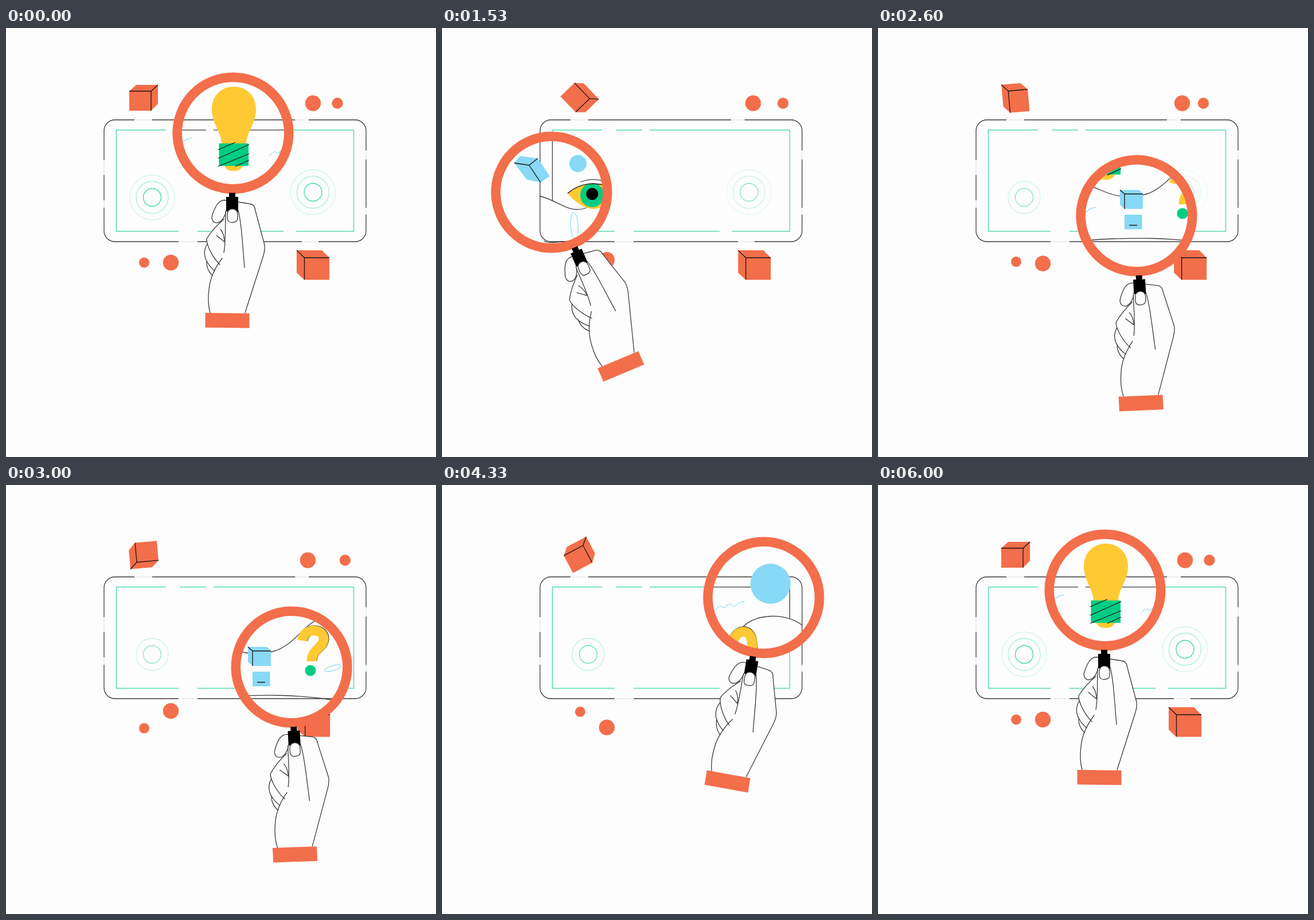
Write an HTML page that moves like this. It is 750 by 747 pixels and loops after 6030 ms.

```html
<!DOCTYPE html>
<html lang="en">
<head>
<meta charset="utf-8">
<title>Magnifier</title>
<style>
  html, body { margin: 0; width: 100%; height: 100%; overflow: hidden; background: #fdfdfd; }
  svg { display: block; width: 100%; height: 100%; }
  .paper { fill: #fdfdfd; }
  .orange { fill: #f36e4a; }
  .blue { fill: #87d9f5; }
  .yellow { fill: #ffc933; }
  .green { fill: #00cc82; }
  .line { fill: none; stroke: #3c3c3c; stroke-width: 1.3; stroke-linecap: round; stroke-linejoin: round; }
  .edge { fill: none; stroke: #1c1512; stroke-width: 1.3; }
  .thin { fill: none; stroke: #87d9f5; stroke-width: 1.1; }
  .mint { fill: none; stroke: #3cd9a5; stroke-width: 1.3; }
  .gap { fill: none; stroke: #fdfdfd; stroke-width: 4; }
  .faint { fill: none; stroke: #dedede; stroke-width: 1; }
</style>
</head>
<body>
<svg viewBox="0 0 750 747" preserveAspectRatio="none">
  <defs>
    <clipPath id="view"><circle id="viewHole" r="92"/></clipPath>
    <rect id="phone" x="171" y="160" width="457" height="212" rx="19"/>
    <rect id="screen" x="192.5" y="177.7" width="414" height="176.3"/>
    <path id="screenGaps" d="M279 177.7H303M349 177.7H362M301 354H334M484 354H506"/>
    <path id="phoneGaps" d="M224 160H255M504 160H528M301 372H334M516 372H545M171 230V256M171 300V313M628 213V229M628 313V325"/>
    <path id="wave" d="M0 0C4 -5 8 -9 11 -7S15 -3 20 -8S27 -11 30 -9S34 -6 39 -11S46 -13 52 -16"/>
    <path id="hook" d="M517 271C519 258 527 253.500 537 253.500C549 253.500 555 261 554 270C552 284 533 287 533 307"/>
    <g id="rings">
      <circle class="mint" r="15.5"/>
      <circle class="mint" r="28" stroke-opacity=".42"/>
    </g>
  </defs>

  <use href="#phone" class="line"/>
  <use href="#phoneGaps" class="gap"/>
  <use href="#phoneGaps" class="faint"/>
  <use href="#screen" class="mint"/>
  <use href="#screenGaps" class="gap"/>

  <g transform="translate(255 295)">
    <use id="ringsL" href="#rings"/>
    <circle id="outerL" class="mint" r="39"/>
  </g>
  <g id="ringsR" transform="translate(535.5 286)">
    <use href="#rings"/>
    <circle class="mint" r="39" stroke-opacity=".22"/>
  </g>

  <g id="cubeTop">
    <path class="orange" d="M215 110L227 99H265V132L253 144H215Z"/>
    <path class="edge" d="M215 110H253L265 99M253 110V144"/>
  </g>
  <g id="cubeLow">
    <path class="orange" d="M0 387H44L57 400V438.500H13L0 426Z"/>
    <path class="edge" d="M0 387L13.500 400H57M13.500 400V438"/>
  </g>
  <g class="orange">
    <circle id="dotA" cy="131" r="13.7"/>
    <circle id="dotB" cy="131" r="9.7"/>
    <circle id="dotC" cx="241" r="9"/>
    <circle id="dotD" cx="287.5" r="13.7"/>
  </g>

  <!-- what the glass reveals -->
  <g clip-path="url(#view)">
    <rect class="paper" width="750" height="747"/>
    <use href="#screen" class="line"/>
    <use href="#screenGaps" class="gap"/>
    <path class="paper" d="M171 293C195 298 215 316 235 316Q245 316 252 313L298 276C330 258 360 270 390 283S440 296 465 290S508 262 526 246C548 224 598 222 628 244V372H171Z"/>
    <path class="line" d="M171 293C195 298 215 316 235 316Q245 316 252 313M298 276C330 258 360 270 390 283S440 296 465 290S508 262 526 246C548 224 598 222 628 244"/>
    <use href="#phone" class="line"/>
    <path class="line" d="M178 371Q184 375 200 373T250 370M297 376C340 373 370 368 410 367S500 364 568 374"/>

    <circle class="blue" cx="237" cy="236" r="15"/>
    <path class="blue" d="M126 235L136 223L167 227L188 258L172 269L148 264Z"/>
    <path class="edge" d="M126 235L152 239L167 227M152 239L172 269"/>
    <ellipse class="thin" cx="231" cy="345" rx="6.5" ry="24" transform="rotate(-3 231 345)"/>

    <g id="eye">
      <path class="yellow" d="M-43 -1C-28 -14 -12 -18 2 -18C18 -17 32 -15 43 -8C30 10 18 26 4 26C-14 26 -30 14 -43 -1Z"/>
      <circle class="green" cy="2" r="21"/>
      <circle r="10.500"/>
      <path class="paper" d="M-30 -30H30V-13Q2 -23 -30 -11Z"/>
      <path class="edge" d="M-43 -1C-28 -14 -12 -18 2 -18C18 -17 32 -15 43 -8"/>
      <path class="line" d="M-20 -21C-8 -26 6 -26 19 -23"/>
    </g>

    <g id="bulb">
      <path class="yellow" d="M376 203C376 180 359 168 359 141C359 118 376 102 397 102C419 102 436 118 436 141C436 168 419 180 419 203ZM380 239Q384 249 397 249T414 239Z"/>
      <rect class="green" x="371.500" y="201" width="51.500" height="39"/>
      <path class="edge" d="M370 212L400 199M370 227L424 203M370 241L424 219M400 241L424 230"/>
    </g>

    <path class="blue" d="M422 282H455L462 288V315H430L422 308Z"/>
    <path class="edge" d="M422 282L430 289H462M430 289V315"/>
    <rect class="blue" x="430" y="325" width="30.500" height="25.500"/>
    <path class="edge" d="M438 343.500H452"/>

    <use href="#wave" class="thin" x="273" y="207"/>
    <use href="#wave" class="thin" x="328" y="328"/>
    <use id="waveR" href="#wave" class="thin"/>
    <ellipse class="thin" cx="570" cy="319" rx="15" ry="4.500" transform="rotate(-17 570 319)"/>
    <circle id="ball" class="blue" cx="573" r="35"/>

    <g id="ask">
      <use href="#hook" fill="none" stroke="#2a2a2a" stroke-width="17" transform="translate(.9 -.4)"/>
      <use href="#hook" fill="none" stroke="#ffc933" stroke-width="17"/>
      <circle class="green" cx="531" cy="323" r="9.5"/>
    </g>
  </g>

  <!-- glass and hand, modelled upright around 396 183 -->
  <g id="glass">
    <circle cx="396" cy="183" r="97.300" fill="none" stroke="#f36e4a" stroke-width="16.500"/>
    <path class="paper" d="M384 300L405 303L424 306C432 307 434 311 435 318L451 378Q452 386 449 396L417 497H356C353 485 352 470 354 455C355 445 357 438 361 431C352 424 349 412 349 404C345 396 346 385 351 376L350 366C355 357 362 347 370 339C362 341 357 335 360 325C366 308 372 298 384 300Z"/>
    <g class="line">
      <path d="M384 300C372 298 366 308 360 325C357 335 363 340 369 339C378 337 383 325 384 318"/>
      <path d="M405 303L424 306C432 307 434 311 435 318L451 378Q452 386 449 396L417 496"/>
      <path d="M383 320C382 340 384 368 380 391M405 318C410 335 412 368 416 417"/>
      <path d="M380 333C366 345 356 357 350 367C350 380 361 400 373 412"/>
      <path d="M374.500 351C379 357 381 365 381 372.500M367 361L381 372.500"/>
      <path d="M351 376C346 384 345 393 348 402C353 413 358 418 364 423M350 405C349 416 353 424 360 431"/>
      <path d="M377 401C364 418 356 435 354 455C352 470 353 485 356 496"/>
    </g>
    <path d="M389 287H400V294H405V320H384V294H389Z"/>
    <path class="paper" d="M384 319L386 340H404L405 321Z"/>
    <path class="paper" stroke="#3c3c3c" stroke-width="1.3" d="M386 324C386 312 404 312 404 324V331Q404 338 395 338.500T386 331Z"/>
    <path class="orange" d="M347.500 496L424.500 497V522.500L347.500 521.500Z"/>
  </g>
</svg>

<script>
const LOOP = 6030, END = 6000;
const $ = id => document.getElementById(id);
const clamp = v => Math.min(1, Math.max(0, v));
const ease = (t, from, to) => {
  const u = clamp((t - from) / (to - from));
  return u * u * (3 - 2 * u);
};
const wave = (t, period, peak = 0) => Math.cos(2 * Math.PI * (t - peak) / period);

// Sway around a rest position, which is held where the loop joins
const sway = (t, rest, size, period, peak) =>
  rest + clamp(Math.min(t, END - t) / 400) * size * wave(t, period, peak);

// Stops of the glass: time, x, y, angle
const stops = [
  [0, 396, 183, 0], [670, 271, 196, -10], [1300, 180, 274, -22.5],
  [1530, 191, 286, -23.5], [2130, 374, 332, -3.5], [3000, 498, 317, -2.8],
  [3900, 570, 253, 6.5], [4330, 561, 196, 9.4], [5270, 517, 186, 11.7], [END, 396, 183, 0]
];

// Monotone cubic through one column of the stops
function glass(t, c) {
  const last = stops.length - 1;
  if (t >= END) return stops[last][c];
  const slope = i => (stops[i + 1][c] - stops[i][c]) / (stops[i + 1][0] - stops[i][0]);
  const tangent = i => {
    if (i === 0 || i === last) return 0;
    const a = slope(i - 1), b = slope(i);
    return a * b <= 0 ? 0 : 2 * a * b / (a + b);
  };
  const i = stops.findIndex(s => s[0] > t) - 1;
  const h = stops[i + 1][0] - stops[i][0], u = (t - stops[i][0]) / h, v = 1 - u;
  return v * v * (1 + 2 * u) * stops[i][c] + u * u * (3 - 2 * u) * stops[i + 1][c]
    + h * u * v * (v * tangent(i) - u * tangent(i + 1));
}

// The upper cube takes a new pose every second
const poses = [0, 46, -95, 175, -28];

const set = (id, name, value) => $(id).setAttribute(name, value);
const move = (id, x, y = 0) => set(id, "transform", `translate(${x} ${y})`);

function draw(t) {
  const x = glass(t, 1), y = glass(t, 2);
  set("glass", "transform", `translate(${x} ${y}) rotate(${glass(t, 3)}) translate(-396 -183)`);
  set("viewHole", "cx", x);
  set("viewHole", "cy", y);

  set("dotA", "cx", sway(t, 535.5, 9, 2400, 1780));
  set("dotB", "cx", sway(t, 578, 17, 1600, 1570));
  set("dotC", "cy", sway(t, 408.5, -16.5, LOOP / 3, 2130));
  set("dotD", "cy", sway(t, 408.5, 16.5, LOOP / 3, 2130));
  move("cubeLow", sway(t, 507, -14, 1075, 2210));
  set("cubeTop", "transform", `rotate(${poses[Math.floor((t + 10) / 1000)] ?? 0} 240 121.7)`);

  const arc = Math.sin(Math.PI * Math.min(1, t / END));
  const look = ease(t, 1530, 2130);
  move("eye", 262 + 25 * look, 289 + 19 * look);
  move("bulb", 0, 15.5 * arc);
  move("waveR", 459 + 22 * arc, 223 - 6 * arc);
  set("ball", "cy", 172 + 10 * ease(t, 4330, 5270));
  const spin = -50 * (Math.max(0, t - 3000) / 1330) ** 1.8;
  set("ask", "transform", `rotate(${spin} 534.5 284.5)`);

  const glow = wave(t, LOOP);
  set("ringsL", "opacity", .8 + .2 * glow);
  set("outerL", "opacity", .22 * Math.max(0, glow));
  set("ringsR", "opacity", t < 4330 ? 1 - t / 4330 : clamp((t - 4330) / (END - 4330)) ** 2);
}

const start = performance.now();
function tick() {
  draw((performance.now() - start) % LOOP);
  requestAnimationFrame(tick);
}
tick();
</script>
</body>
</html>
```
